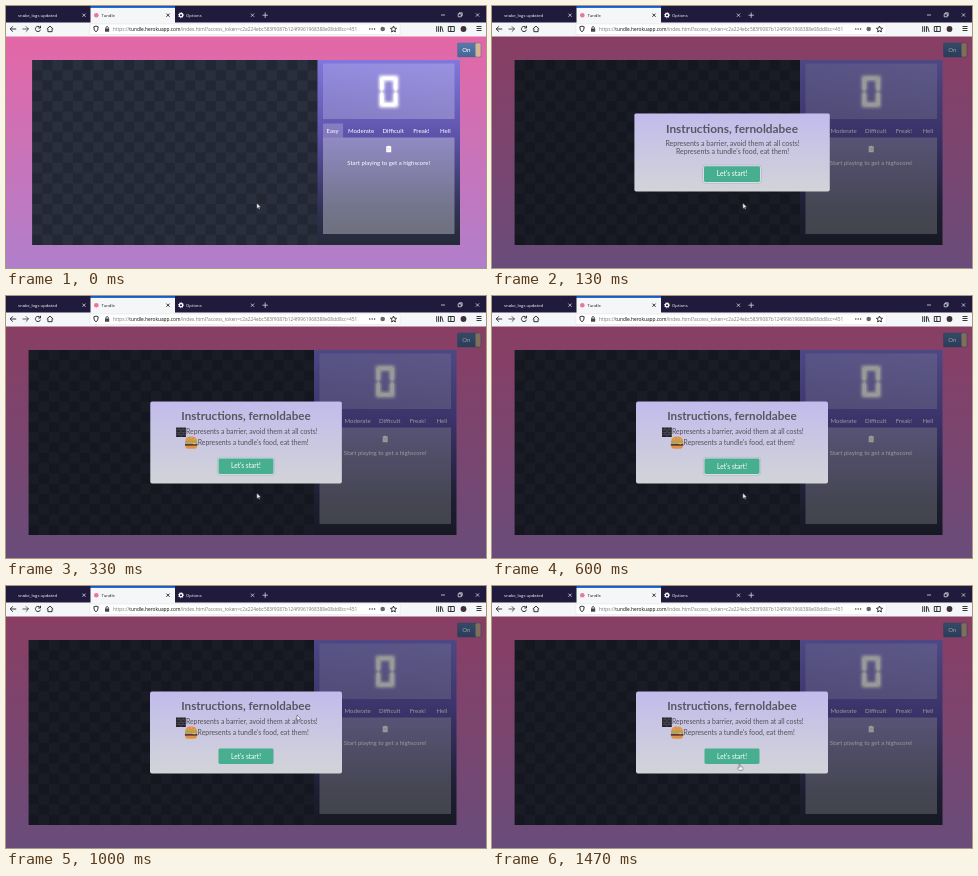
An HTML page for the animation above (1540 ms loop, 480 by 262 pixels).

```html
<!DOCTYPE html>
<html lang="en">
<head>
<meta charset="utf-8">
<title>Tundle</title>
<style>
  html, body { margin: 0; width: 100%; height: 100%; overflow: hidden; background: #201b3c; }
  svg { display: block; width: 100vw; height: 100vh; }
  text { white-space: pre; }
  .ui { font: 4.25px "Open Sans", sans-serif; }
  .url { font: 4.8px "Open Sans", sans-serif; fill: #77777c; }
  .page { font: 6.1px Lato, sans-serif; fill: #fff; }
  .page .mid { font-size: 6px; }
  .mid { text-anchor: middle; }
  .title { font: bold 11.65px Lato, sans-serif; fill: #595661; }
  .body { font: 6.87px Lato, sans-serif; fill: #545258; }
  .btn { font: 6.6px Lato, sans-serif; fill: #fff; }
  .line { fill: none; stroke: #1f1f25; stroke-width: .9; }
  .light { stroke: #f0f0f5; stroke-width: .7; }
  #modal { transform-origin: 240px 146.4px; }
</style>
</head>
<body>
<svg viewBox="0 0 480 262" preserveAspectRatio="none">
  <defs>
    <linearGradient id="sky" x2="0" y2="1">
      <stop stop-color="#e467a6"/><stop offset="1" stop-color="#b07fcb"/>
    </linearGradient>
    <linearGradient id="side" x2="0" y2="1">
      <stop stop-color="#8177dc"/><stop offset=".4" stop-color="#5f54ac"/>
      <stop offset=".8" stop-color="#313354"/><stop offset="1" stop-color="#252a39"/>
    </linearGradient>
    <linearGradient id="card" x2="0" y2="1">
      <stop stop-color="#c2bbec"/><stop offset="1" stop-color="#d2d4d8"/>
    </linearGradient>
    <linearGradient id="switch" x2="0" y2="1">
      <stop stop-color="#567cac"/><stop offset="1" stop-color="#456594"/>
    </linearGradient>
    <linearGradient id="sheen" x2="1" y2="1">
      <stop stop-color="#fff" stop-opacity=".16"/><stop offset="1" stop-color="#fff" stop-opacity=".25"/>
    </linearGradient>
    <pattern id="check" x="22.6" y="54" width="20.4" height="20.56" patternUnits="userSpaceOnUse">
      <path fill="#2a2f3d" d="M0 0h20.4v20.56H0z"/>
      <path fill="#222734" d="M10.2 0h10.2v10.28H10.2zM0 10.28h10.2v10.28H0z"/>
    </pattern>
    <filter id="glow" x="-60%" y="-40%" width="220%" height="180%">
      <feGaussianBlur stdDeviation="1.5"/>
    </filter>
    <clipPath id="field"><path d="M84 17h275v14H84z"/></clipPath>
    <path id="zero" d="M372.8 71.5h12.6l-2.3 3h-8zM372.8 99.5h12.6l-2.3-3h-8zM371 72.6l3.2 3v7.4l-1.6 1.8-1.6-1.6zM387.2 72.6l-3.2 3v7.4l1.6 1.8 1.6-1.6zM371 98.4l3.2-3V88l-1.6-1.8-1.6 1.6zM387.2 98.4l-3.2-3V88l1.6-1.8 1.6 1.6z"/>
    <path id="x" d="M-1.6-1.6 1.6 1.6M1.6-1.6-1.6 1.6"/>
  </defs>

  <!-- page -->
  <rect y="30" width="480" height="232" fill="url(#sky)"/>
  <g id="game">
    <path fill="url(#check)" d="M22.6 54h286.4v185H22.6z"/>
    <path fill="url(#side)" d="M308 54h142.5v185H308z"/>
    <rect x="313.5" y="57.5" width="131.5" height="55.5" fill="url(#sheen)"/>
    <rect x="313.5" y="117.5" width="20" height="14" fill="#fff" opacity=".22"/>
    <rect x="313.5" y="131.5" width="131.5" height="96.5" fill="#fff" opacity=".32"/>
    <g transform="translate(379.2 85.5) scale(1.06) translate(-379.1 -85.5)" fill="#fff">
      <use href="#zero" stroke="#fff" stroke-width="2" filter="url(#glow)"/>
      <use href="#zero"/>
    </g>
    <g class="page">
      <text x="317" y="127">Easy</text>
      <text x="338.5" y="127">Moderate</text>
      <text x="373" y="127">Difficult</text>
      <text x="403.7" y="127">Freak!</text>
      <text x="430.5" y="127">Hell</text>
      <text x="379.2" y="158.8" class="mid">Start playing to get a highscore!</text>
      <path d="M376.7 140.3h1.3q1.1-1.6 2.2 0h1.5v6h-5z"/>
      <path d="M377.7 142.5h3M377.7 144h3" stroke="#a5a5b5" stroke-width=".3"/>
    </g>
  </g>
  <rect x="451.5" y="37" width="23.5" height="14" rx="1" fill="url(#switch)" stroke="#48618c" stroke-width=".4"/>
  <rect x="469.5" y="37.3" width="5.2" height="13.4" rx=".8" fill="#d4b695"/>
  <text x="456.3" y="46.2" class="page">On</text>
  <rect id="shade" y="30" width="480" height="232"/>

  <!-- dialog -->
  <g id="modal">
    <rect id="box" x="144" width="192" rx="2" fill="url(#card)"/>
    <text id="head" x="240" class="title mid">Instructions, fernoldabee</text>
    <text id="row1" class="body mid">Represents a barrier, avoid them at all costs!</text>
    <text id="row2" class="body mid">Represents a tundle's food, eat them!</text>
    <g id="icons">
      <path fill="#23222b" d="M170 131.5h9.8v9.5H170z"/>
      <path fill="none" stroke="#77747f" stroke-width=".45" d="M170 133.9h9.8M170 136.3h9.8M170 138.7h9.8M173 131.5v2.4M177 131.5v2.4M175 133.9v2.4M173 136.3v2.4M177 136.3v2.4M175 138.7v2.3"/>
      <path fill="#dd9441" d="M179 145.7q.4-5.2 6.1-5.2t6.1 5.2zM179.3 150h11.6q0 2.8-2.5 2.8h-6.6q-2.5 0-2.5-2.8z"/>
      <path fill="#6b3423" d="M178.9 147.6h12.4v2.2h-12.4z"/>
      <path fill="#f3c43d" d="M179 146.5h12.2l-3 1.9-2-1.1h-7.2z"/>
      <path fill="#6f9f3c" d="M179 145.6h12.2v1H179z"/>
      <path stroke="#f5d49b" stroke-width=".6" d="M182 143h.8M185 141.8h.8M188 143.2h.8"/>
    </g>
    <g id="go">
      <g id="ring" fill="none" stroke-width=".8">
        <rect x="211.4" y="161.4" width="57.2" height="17.7" rx="2.4" stroke="#7d98b0" stroke-opacity=".5"/>
        <rect x="212.1" y="162.1" width="55.8" height="16.3" rx="1.8" stroke="#f4f4f8" stroke-opacity=".65"/>
      </g>
      <rect x="212.5" y="162.5" width="55" height="15.5" rx="1.4" fill="#48ae90"/>
      <text x="240" y="172.5" class="btn mid">Let's start!</text>
    </g>
  </g>

  <!-- browser bars -->
  <path fill="#201b3c" d="M0 0h480v17H0z"/>
  <path fill="#f5f6f7" d="M0 16.5h480v14H0zM84.5 2H169v15H84.5z"/>
  <path fill="#1a6fe8" d="M84.5.3H169V2H84.5z"/>
  <path fill="#fff" stroke="#d0d0d4" stroke-width=".3" d="M84 18h310v10.5H84z"/>
  <g class="ui">
    <text x="12" y="10.7" fill="#fff">snake_logs updated</text>
    <text x="95.5" y="10.7" fill="#18181c">Tundle</text>
    <text x="180" y="10.7" fill="#fff">Options</text>
  </g>
  <circle cx="90.3" cy="9.2" r="2.3" fill="#e8789b"/>
  <circle cx="175" cy="9.2" r="1.7" fill="none" stroke="#fff" stroke-width="1.3"/>
  <circle cx="175" cy="9.2" r="2.6" fill="none" stroke="#fff" stroke-width=".7" stroke-dasharray="1 1.04"/>
  <use href="#x" x="78" y="9.2" class="line light"/>
  <use href="#x" x="162" y="9.2" class="line"/>
  <use href="#x" x="246.5" y="9.2" class="line light"/>
  <path class="line light" d="M256.5 9.2h5.4M259.2 6.5v5.4M435 9h4M452.2 7.8h3v3h-3zM453.2 7.8v-1h3v3h-1"/>
  <use href="#x" x="471.5" y="9" class="line light"/>
  <path class="line" d="M10.2 23H4.2M6.9 20.3 4.2 23l2.7 2.7M33.9 21.2a2.6 2.6 0 1 0 .6 2.5M34.5 19.8v2.2h-2.2M40.8 23l3.2-2.9 3.2 2.9M41.9 22.7v3h4.2v-3"/>
  <path class="line" stroke-opacity=".8" d="M16.5 23h6M19.8 20.3l2.7 2.7-2.7 2.7"/>
  <path class="line" d="M90 20.1l2.2.7q.1 3.8-2.2 5.1-2.3-1.3-2.2-5.1zM99.8 22.6v-1q1.3-2.4 2.6 0v1"/>
  <path fill="#44444a" d="M99 22.5h4.2v3.2H99z"/>
  <text class="url" x="107" y="24.9" clip-path="url(#field)">https://<tspan fill="#0c0c0d">tundle.herokuapp.com</tspan>/index.html?access_token=c2a224ebc583f9087b124f9961968388e08dd8cc=451</text>
  <g fill="#2c2c32">
    <circle cx="363.8" cy="23" r=".7"/><circle cx="366.2" cy="23" r=".7"/><circle cx="368.6" cy="23" r=".7"/>
    <circle cx="376.7" cy="23" r="2.3" fill="#66666c"/><circle cx="457.5" cy="23" r="2.9" fill="#43303f"/>
  </g>
  <path class="line" d="M387.5 20l.9 2.1 2.2.2-1.7 1.5.5 2.2-1.9-1.2-1.9 1.2.5-2.2-1.7-1.5 2.2-.2zM430.7 20.2v5.7M432.6 20.2v5.7M434.5 20.2v5.7M435.6 20.5l1.5 5.4M442.3 20.5h6v5h-6zM444.8 20.5v5M470.5 20.5h5M470.5 22.5h5M470.5 24.5h5"/>

  <g id="cursor" fill="#fff" stroke="#17171d" stroke-width=".4" stroke-linejoin="round">
    <path id="arrow" d="M0 0v5.7l1.3-1.2.9 2 .9-.4-.9-1.9H4z"/>
    <path id="hand" d="M-.6.4q.6-.9 1.2 0v2.2l2.2.6q.7.3.5 1.3L2.8 6.3H-.4L-2 4.2q.1-.9 1.4-.1z"/>
  </g>
</svg>
<script>
const LOOP = 1540, LAST = 22, STEP = 1000 / 15;
const el = id => document.getElementById(id);
const show = (id, on) => el(id).style.visibility = on ? "visible" : "hidden";
const set = (id, attrs) => Object.entries(attrs).forEach(([k, v]) => el(id).setAttribute(k, v));
const scale = (s, offset) => ({ transform: `scale(${s})`, offset, easing: "ease" });

// time, x, y of the pointer
const path = [
  [0, 250.8, 197], [620, 250.8, 197], [800, 266, 170], [933, 287, 135], [1000, 291, 129],
  [1080, 291, 130], [1240, 274, 150], [1400, 250, 175], [1467, 247.5, 178], [LOOP, 247.5, 178]
];
const timeline = [
  el("modal").animate([scale(.7, 0), scale(1.05, .45), scale(.95, .8), scale(1, 1)],
    { delay: 47, duration: 300, fill: "both" }),
  el("shade").animate([{ opacity: 0 }, { opacity: .4 }],
    { delay: 40, duration: 85, fill: "both" }),
  el("cursor").animate(path.map(([t, x, y]) => ({ transform: `translate(${x}px, ${y}px)`, offset: t / LOOP })),
    { duration: LOOP, fill: "both" })
];
timeline.forEach(a => a.pause());

function layout(loaded) {
  set("box", loaded ? { y: 105.5, height: 82 } : { y: 108, height: 76.8 });
  set("head", { y: loaded ? 124 : 127 });
  set("row1", { x: loaded ? 245.8 : 240.5, y: loaded ? 138.2 : 140.3 });
  set("row2", { x: loaded ? 247.2 : 240.5, y: loaded ? 148.6 : 148.4 });
  set("go", { transform: `translate(0 ${loaded ? 0 : -2.5})` });
  show("icons", loaded);
}

function draw(step) {
  const now = step * STEP;
  timeline.forEach(a => a.currentTime = now);
  layout(step > 3);
  el("modal").style.display = step ? "" : "none";
  set("game", { transform: `translate(${step ? 0 : 3.5} 0)` });
  show("ring", step < 13);
  const over = step > 20;
  show("hand", over);
  show("arrow", !over);
}

function tick() {
  const tens = Math.floor(performance.now() % LOOP / 10);
  draw(Math.min(LAST, Math.floor((tens + .49) * .15)));
  requestAnimationFrame(tick);
}
tick();
</script>
</body>
</html>
```
